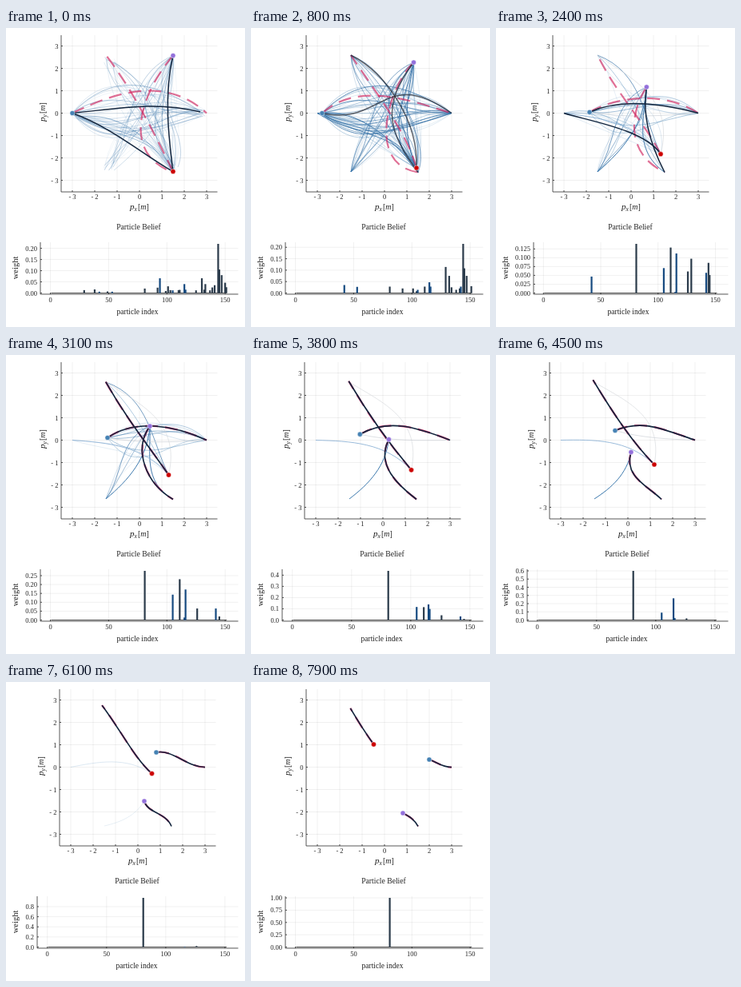
An HTML page that plays this animation: 299 px wide and 374 px high, repeating every 8000 ms.

```html
<!DOCTYPE html>
<html lang="en">
<head>
<meta charset="utf-8">
<title>Particle Belief</title>
<style>
  html, body { margin: 0; width: 100%; height: 100%; overflow: hidden; background: #fff; }
  svg { display: block; width: 100vw; height: 100vh; }
  text { font-family: "Liberation Serif", "Noto Serif", serif; fill: #222; font-size: 8.5px; }
  .grid { stroke: #000; stroke-opacity: .1; stroke-width: .6; }
  .axis { stroke: #222; stroke-width: .75; fill: none; }
  .curve { fill: none; }
  .label { font-size: 9.5px; }
</style>
</head>
<body>
<svg id="stage" viewBox="0 0 299 374"></svg>
<script>
const LOOP = 8000, STEP = 100;
const TIMES = [0, 800, 1800, 3100, 4500, 6100, 7900];
const DARK = '#13253d', STEEL = '#4682b4';
const EAST = [251, 106.5], WEST = [83, 106.5];
const NW = [125, 34], SW = [125, 180], SE = [209, 180.5];

// Each row: position, then the points a third and two thirds along the plan.
const agents = [
  { color: STEEL, goal: EAST, rows: [
    [83, 106.5, 130, 87, 190, 79], [89, 106.5, 141, 85, 198, 91],
    [105, 106, 147, 91, 200, 87.5], [127, 103.5, 165, 89.5, 208, 92],
    [151, 94.5, 182, 88, 213, 93.5], [190, 88, 210, 91, 230, 101],
    [223, 97, 232, 101, 241, 105]] },
  { color: '#9370db', goal: SE, rows: [
    [209, 34.5, 178, 84, 170, 140], [203.5, 43, 177, 88, 171, 146],
    [192.5, 61.5, 174, 100, 172, 145], [180, 89, 170.5, 122, 182, 155],
    [171, 121.5, 173, 147, 190, 165], [175, 149, 184, 160, 198, 168],
    [190, 164, 198, 168.5, 204, 173.5]] },
  { color: '#cc0000', goal: NW, rows: [
    [209, 179.5, 183, 128, 155, 78], [207, 175, 185, 125, 153, 75],
    [204.5, 164.5, 180, 120, 150, 77], [203.5, 150, 177, 113, 151, 76],
    [200, 137, 174, 107, 149, 72], [184.5, 114.5, 164, 91, 144, 61],
    [153.5, 78, 143, 63, 134, 49]] }
];

// Strongest guesses before the belief settles: agent, two via points, end.
const guesses = [
  { until: 500, color: DARK, opacity: 1, list: [
    [0, [138, 100.5], [190, 98], [243, 105]],
    [1, [202.5, 85], [204, 135], SE],
    [2, [172, 156], [130, 129], WEST]] },
  { until: 1300, color: '#20242e', opacity: .7, list: [
    [0, [145, 101], [188, 84], EAST],
    [1, [178, 92], [182, 135], SE],
    [2, [197, 118], [167, 68], NW]] },
  { until: 2500, color: DARK, opacity: 1, list: [
    [0, [150, 95.5], [200, 97], EAST],
    [1, [189.5, 98], [195, 138], SE],
    [2, [170, 137], [122, 119], WEST]] }
];

// Pairs of particle index and weight in thousandths.
const weights = [];
const belief = (time, ...pairs) => {
  const bars = {};
  for (let i = 0; i < pairs.length; i += 2) bars[pairs[i]] = pairs[i + 1] / 1000;
  weights.push({ time, bars });
};
belief(0, 29, 13, 38, 16, 42, 6, 49, 7, 53, 6, 81, 20, 92, 24, 94, 66, 99, 9, 101, 30, 103, 13, 105, 12,
  110, 13, 111, 14, 115, 40, 116, 15, 125, 12, 130, 66, 132, 15, 133, 40, 137, 12, 139, 25, 141, 35,
  144, 220, 145, 105, 147, 80, 150, 46, 151, 26);
belief(800, 42, 35, 53, 27, 81, 28, 92, 20, 101, 20, 104, 8, 105, 14, 111, 28, 115, 47, 116, 28,
  129, 114, 132, 75, 134, 25, 138, 14, 141, 20, 142, 28, 144, 215, 145, 108, 147, 75, 151, 30);
belief(1800, 42, 87, 53, 40, 81, 53, 92, 18, 105, 13, 111, 60, 115, 33, 116, 66, 126, 53, 129, 120,
  132, 53, 133, 10, 141, 18, 142, 40, 144, 154, 145, 106, 147, 33, 151, 33);
belief(2200, 42, 60, 81, 100, 105, 50, 111, 100, 116, 95, 126, 60, 129, 125, 142, 55, 144, 110, 145, 60);
belief(3100, 81, 277, 105, 143, 111, 230, 115, 14, 116, 172, 126, 65, 142, 65, 145, 20);
belief(4500, 81, 600, 105, 90, 115, 265, 116, 25, 126, 20);
belief(6100, 81, 974, 116, 8, 126, 20);
belief(6300, 81, 988, 126, 10);
belief(7000, 81, 1000);
belief(8000, 81, 1000);
const BLUE_BARS = [42, 53, 94, 105, 115, 116, 142];

let seed = 7;
const rand = () => (seed = (seed * 16807) % 2147483647) / 2147483647;
const f = v => +v.toFixed(2);
const mix = (a, b, u) => a + (b - a) * u;

// agent, goal, count, bias and spread of the sideways bow
const particles = [
  [0, EAST, 26, 0, 30], [1, SE, 13, 17, 18], [1, SW, 15, -4, 17],
  [2, NW, 15, 6, 20], [2, WEST, 17, 12, 18]
].flatMap(([who, goal, n, bias, spread]) => Array.from({ length: n }, () => {
  const bow = bias + (rand() * 2 - 1) * spread;
  const strong = rand() ** 2;
  return {
    who, goal, strong,
    bow: [bow + (rand() - .5) * 16, bow * .8 + (rand() - .5) * 16],
    jitter: [(rand() - .5) * 14, (rand() - .5) * 10],
    until: 1000 + 2800 * rand() ** 1.7
  };
}));

const survivors = [
  { who: 1, goal: SW, bow: [-17, -15], color: '#3b78ad', width: 1 },
  { who: 2, goal: WEST, bow: [15, 12], color: '#8fb4d6', width: .9 },
  { who: 2, goal: NW, bow: [32, 24], color: '#d2d5d8', width: .6, until: 5000 },
  { who: 0, goal: EAST, bow: [5, 4], color: '#c6ccd2', width: .6, until: 5000 }
];

// Smooth interpolation of a whole row between uneven key times.
function rowAt(rows, t) {
  let i = TIMES.findIndex(k => k > t) - 1;
  if (i < 0) i = TIMES.length - 2;
  const span = TIMES[i + 1] - TIMES[i], u = Math.min(1, (t - TIMES[i]) / span);
  const slope = (k, c) => {
    const a = Math.max(0, k - 1), b = Math.min(TIMES.length - 1, k + 1);
    return (rows[b][c] - rows[a][c]) / (TIMES[b] - TIMES[a]) * span;
  };
  return rows[i].map((v, c) =>
    v * (1 + 2 * u) * (1 - u) ** 2 + slope(i, c) * u * (1 - u) ** 2 +
    rows[i + 1][c] * u * u * (3 - 2 * u) + slope(i + 1, c) * u * u * (u - 1));
}

// Cubic from p to g through a and b.
function through(p, a, b, g) {
  const c1 = p.map((v, k) => f((-5 * v + 18 * a[k] - 9 * b[k] + 2 * g[k]) / 6));
  const c2 = p.map((v, k) => f((2 * v - 9 * a[k] + 18 * b[k] - 5 * g[k]) / 6));
  return `M${p.map(f)}C${c1} ${c2} ${g.map(f)}`;
}

function bowed(p, start, goal, bow) {
  const dx = goal[0] - p[0], dy = goal[1] - p[1], len = Math.hypot(dx, dy) || 1;
  const scale = len / Math.hypot(goal[0] - start[0], goal[1] - start[1]);
  const via = (u, o) => [p[0] + dx * u - dy / len * o * scale, p[1] + dy * u + dx / len * o * scale];
  return through(p, via(1 / 3, bow[0]), via(2 / 3, bow[1]), goal);
}

const curve = (d, color, width, opacity = 1, extra = '') =>
  `<path class="curve" d="${d}" stroke="${color}" stroke-width="${f(width)}" stroke-opacity="${f(opacity)}" ${extra}/>`;
const line = (x1, y1, x2, y2, cls) =>
  `<line class="${cls}" x1="${f(x1)}" y1="${f(y1)}" x2="${f(x2)}" y2="${f(y2)}"/>`;
const text = (x, y, s, anchor = 'middle', extra = '') =>
  `<text x="${f(x)}" y="${f(y)}" text-anchor="${anchor}" ${extra}>${s}</text>`;
const axisName = sub =>
  `<text font-style="italic" style="font-size:11px" x="-12" y="3">p</text>` +
  `<text font-style="italic" style="font-size:7.5px" x="-6.5" y="5">${sub}</text>` +
  `<text style="font-size:10px" x="-2" y="3">[<tspan font-style="italic">m</tspan>]</text>`;

function weightsAt(t) {
  const i = weights.findIndex(k => k.time > t);
  const a = weights[i - 1], b = weights[i], u = (t - a.time) / (b.time - a.time);
  return [...new Set([...Object.keys(a.bars), ...Object.keys(b.bars)])]
    .map(k => [+k, mix(a.bars[k] || 0, b.bars[k] || 0, u)]);
}

function tickStep(max) {
  if (max < .14) return [.025, 3];
  if (max < .3) return [.05, 2];
  if (max < .62) return [.1, 1];
  return max < .985 ? [.2, 1] : [.25, 2];
}

function drawPlan(t, shift) {
  const frame = [], marks = [], curves = [];
  for (let v = -3; v <= 3; v++) {
    const x = 167 + 28 * v, y = 106.5 - 28 * v, name = v < 0 ? '- ' + -v : v;
    frame.push(line(x, 9, x, 205, 'grid'), line(69, y, 264.5, y, 'grid'),
      line(x, 205, x, 203, 'axis'), line(69, y, 71, y, 'axis'),
      text(x, 213.7, name), text(65.5, y + 3, name, 'end'));
  }
  frame.push('<path class="axis" d="M69 9V205H264.5"/>',
    `<g transform="translate(167 224)">${axisName('x')}</g>`,
    `<g transform="translate(46 105) rotate(-90)">${axisName('y')}</g>`,
    text(166, 252, 'Particle Belief', 'middle', 'style="font-size:9.7px"'));

  const rows = agents.map(a => rowAt(a.rows, t));
  const spots = rows.map(r => r.slice(0, 2));
  const starts = agents.map(a => a.rows[0]);
  const lift = 5 * Math.exp(-(((t - 5800) / 1700) ** 2));
  const plans = agents.map((a, i) => {
    const r = rows[i], g = a.goal === NW ? [NW[0] - .6 * lift, NW[1] - lift] : a.goal;
    return through(spots[i], r.slice(2, 4), r.slice(4), g);
  });

  const loose = Math.max(0, 1 - t / 400);
  for (const p of particles) {
    if (t >= p.until) continue;
    const spot = spots[p.who];
    const goal = p.goal.map((v, k) => v + loose * ((spot[k] - v) * .045 + p.jitter[k]));
    const grow = Math.min(1, .5 + t / 1600);
    curves.push(curve(bowed(spot, starts[p.who], goal, p.bow),
      p.strong > .5 ? '#2f6ca3' : STEEL, .5 + .5 * p.strong, (.25 + .65 * p.strong) * grow));
  }
  if (t >= 1500) for (const s of survivors) {
    if (t >= (s.until || 6500)) continue;
    curves.push(curve(bowed(spots[s.who], starts[s.who], s.goal, s.bow),
      s.color, s.width, t < 5000 ? 1 : s.goal === SW ? .12 : .35));
  }
  plans.forEach(d => curves.push(curve(d, '#d0245f', 2.2, t < 2500 ? .65 : .95, 'stroke-dasharray="16 9"')));
  const guess = guesses.find(g => t < g.until);
  if (guess) guess.list.forEach(([who, a, b, g]) => {
    // Via points drift with the agent inside each interval.
    const ref = agents[who].rows[guesses.indexOf(guess)];
    const move = (p, k) => p.map((v, c) => v + (spots[who][c] - ref[c]) * k);
    curves.push(curve(through(spots[who], move(a, .66), move(b, .33), g), guess.color, 1.5, guess.opacity));
  });
  else plans.forEach(d => curves.push(curve(d, DARK, 1.65)));

  spots.forEach(([x, y], i) => marks.push(
    `<circle cx="${f(x)}" cy="${f(y)}" r="3.1" fill="${agents[i].color}" stroke="#fff" stroke-width=".5"/>`));
  return `<g transform="translate(${shift} 0)">${frame.join('')}` +
    `<svg x="69" y="9" width="196" height="196" viewBox="69 9 196 196">${curves.join('')}</svg>${marks.join('')}</g>`;
}

function drawWeights(bars, max, step, digits, shift) {
  const left = 43 + 2 * shift, unit = (290.5 - left) / 169.8, zero = 331.5;
  const px = i => left + (i + 8.6) * unit, py = w => zero - 61.5 * w / max;
  const out = [];
  for (let i = 0; i <= 150; i += 50)
    out.push(line(px(i), 268, px(i), 333, 'grid'), line(px(i), 333, px(i), 331, 'axis'), text(px(i), 342.5, i));
  for (let w = 0; w <= max + 1e-6; w += step)
    out.push(line(left, py(w), 290.5, py(w), 'grid'), line(left, py(w), left + 2, py(w), 'axis'),
      text(left - 4, py(w) + 3, w.toFixed(digits), 'end'));
  out.push(`<path class="axis" d="M${left} 268V333H290.5"/>`, line(px(.6), zero, px(151.4), zero, 'axis'));
  for (const [i, w] of bars) if (w > .003) {
    const color = BLUE_BARS.includes(i) ? '#164a80' : '#2b3b4b';
    out.push(`<rect x="${f(px(i) - 1.1)}" y="${f(py(w))}" width="2.2" height="${f(zero - py(w))}" fill="${color}"/>`);
  }
  out.push(text(164.5 + shift * .5, 358, 'particle index', 'middle', 'class="label"'),
    text(0, 0, 'weight', 'middle', 'style="font-size:10.5px" transform="translate(14.5 300) rotate(-90)"'));
  return out.join('');
}

const stage = document.getElementById('stage');
let shown = -1;
function tick(now) {
  const t = Math.floor((now % LOOP) / STEP) * STEP;
  if (t !== shown) {
    shown = t;
    const bars = weightsAt(t), max = Math.max(...bars.map(b => b[1]));
    const [step, digits] = tickStep(max), shift = 2 * (digits - 2);
    stage.innerHTML = drawPlan(t, shift) + drawWeights(bars, max, step, digits, shift);
  }
  requestAnimationFrame(() => tick(performance.now() - begin));
}
const begin = performance.now();
tick(0);
</script>
</body>
</html>
```
